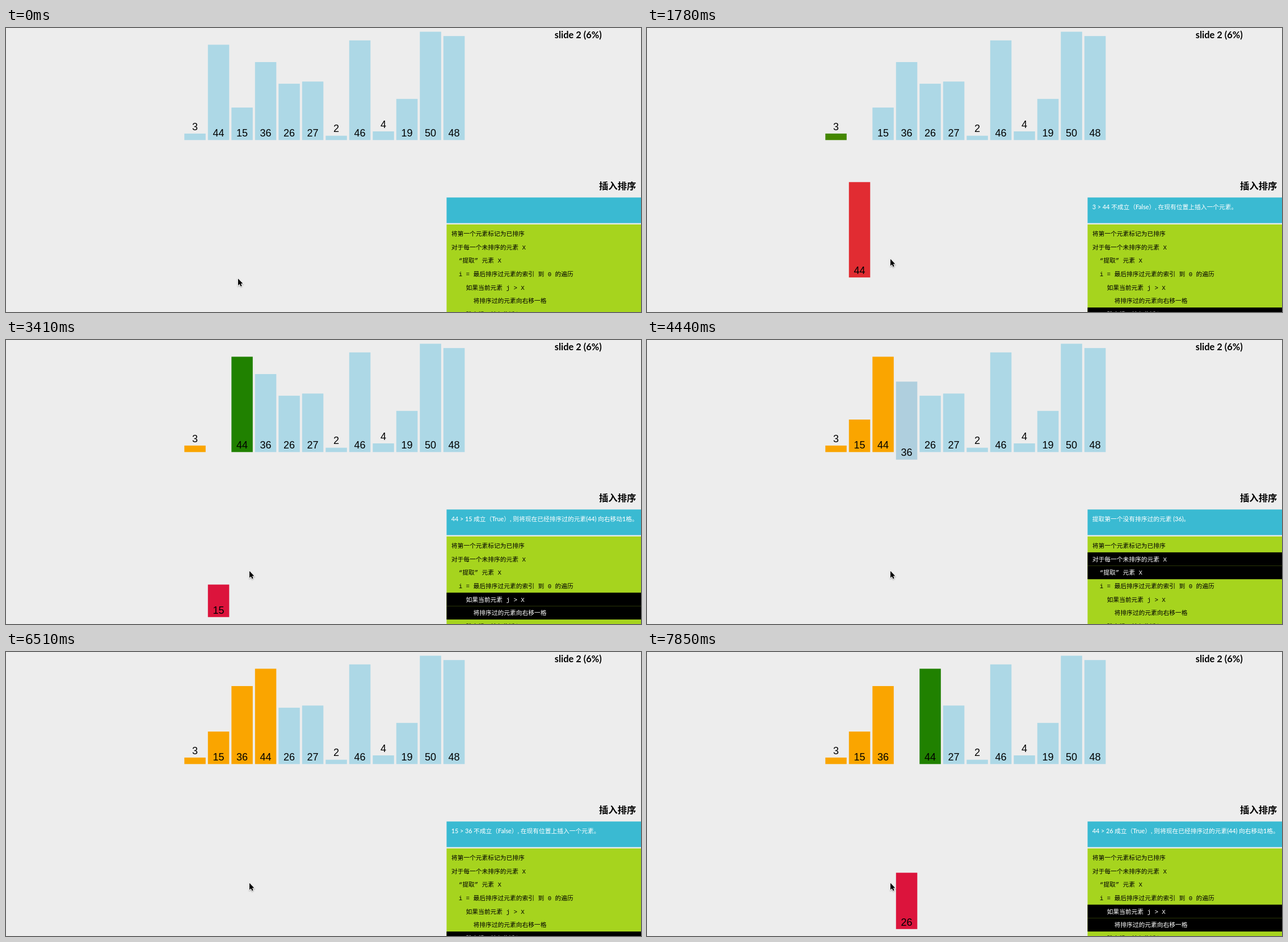
Write an HTML page with a canvas that moves like this. It is 1119x500 px and loops after 7.99 s.

```html
<!DOCTYPE html>
<html lang="zh">
<head>
<meta charset="utf-8">
<title>插入排序</title>
<style>
html, body { margin: 0; width: 1119px; height: 500px; overflow: hidden; background: #ededed; }
canvas { display: block; }
</style>
</head>
<body>
<canvas id="stage" width="1119" height="500"></canvas>
<script>
const ctx = document.getElementById('stage').getContext('2d');

const LOOP = 7990, FIRST_STEP = 348, STEP_GAP = 448.4, EASE_TIME = 250;
const BLUE = [173, 216, 230], ORANGE = [250, 165, 0], GREEN = [32, 129, 0], RED = [220, 20, 60];
const BAR_X = 314.3, PITCH = 41.5, BAR_W = 37.5, BASE = 197.3, UNIT = 3.815, DROP = 290.5;
const PANEL_X = 776.4, LINE_H = 23.65;
const CODE = [
  '将第一个元素标记为已排序',
  '对于每一个未排序的元素 X',
  '  “提取” 元素 X',
  '  i = 最后排序过元素的索引 到 0 的遍历',
  '    如果当前元素 j > X',
  '      将排序过的元素向右移一格',
  '    跳出循环并在此插入'
];
const CJK = '"Noto Sans CJK SC", "Noto Sans CJK", sans-serif';

// The picture is sampled every 150 ms, with a few shorter intervals.
const shortStarts = new Set([300, 740, 2080, 3270, 3560, 3850, 4440, 5330, 6070, 7560, 7850]);
const ticks = [];
for (let t = 0; t < LOOP; t += shortStarts.has(t) ? 140 : 150) ticks.push(t);

const bars = [3, 44, 15, 36, 26, 27, 2, 46, 4, 19, 50, 48].map((value, slot) =>
  ({ value, keys: [{ at: -1e4, slot, drop: 0, color: BLUE }] }));
const steps = [];

const stepTime = k => FIRST_STEP + k * STEP_GAP;

function addStep(message, firstLine, lastLine, changes) {
  const at = stepTime(steps.length);
  steps.push({ at, message, firstLine, lastLine });
  for (const [bar, props] of changes) {
    bar.keys.push({ ...bar.keys[bar.keys.length - 1], ...props, at });
  }
}

function planSort() {
  const row = [...bars];
  addStep(`将第一个元素 (${row[0].value}) 标记为已排序。`, 0, 0, [[row[0], { color: ORANGE }]]);
  for (let i = 1; stepTime(steps.length) < LOOP; i++) {
    const x = row[i];
    addStep(`提取第一个没有排序过的元素 (${x.value})。`, 1, 2, [[x, { drop: DROP, color: RED }]]);
    let shifted = null;
    for (let j = i - 1; j >= 0; j--) {
      const bar = row[j];
      const changes = [[bar, { color: GREEN }]];
      if (shifted) changes.push([shifted, { color: ORANGE }]);
      addStep(`找出插入的位置；与已经排序过的元素 (${bar.value}) 进行比较。`, 3, 3, changes);
      if (bar.value <= x.value) {
        addStep(`${bar.value} > ${x.value} 不成立（False）, 在现有位置上插入一个元素。`, 6, 6,
          [[bar, { color: ORANGE }], [x, { drop: 0, color: ORANGE }]]);
        break;
      }
      addStep(`${bar.value} > ${x.value} 成立（True）, 则将现在已经排序过的元素(${bar.value}) 向右移动1格。`, 4, 5,
        [[bar, { slot: j + 1 }], [x, { slot: j }]]);
      row[j + 1] = bar;
      row[j] = x;
      shifted = bar;
    }
  }
}

const mix = (a, b, p) => a + (b - a) * p;
const cubicInOut = p => p < 0.5 ? 4 * p ** 3 : 1 - 4 * (1 - p) ** 3;

function poseAt(bar, t) {
  const n = bar.keys.findLastIndex(key => key.at <= t);
  const to = bar.keys[n], from = bar.keys[Math.max(0, n - 1)];
  const p = cubicInOut(Math.min(1, (t - to.at) / EASE_TIME));
  return {
    x: BAR_X + mix(from.slot, to.slot, p) * PITCH,
    bottom: BASE + mix(from.drop, to.drop, p),
    color: `rgb(${to.color.map((c, i) => Math.round(mix(from.color[i], c, p)))})`
  };
}

function box(color, x, y, w, h) {
  ctx.fillStyle = color;
  ctx.fillRect(x, y, w, h);
}

function write(text, x, y, font, color = '#000', align = 'left') {
  ctx.font = font;
  ctx.fillStyle = color;
  ctx.textAlign = align;
  ctx.fillText(text, x, y);
}

function drawBar(bar, t) {
  const { x, bottom, color } = poseAt(bar, t);
  const height = bar.value * UNIT;
  box(color, x, bottom - height, BAR_W, height);
  const labelBase = height < 20 ? bottom - height : bottom;
  write(bar.value, x + BAR_W / 2, labelBase - 6.2, '18px "Liberation Sans", Arial, sans-serif', '#000', 'center');
}

function drawPanel(step) {
  box('#3abad2', PANEL_X, 298.4, 343, 45.1);
  box('#a6d41e', PANEL_X, 345.8, 343, 155);
  if (step) write(step.message, 784.8, 318.6, `500 10.75px Lato, ${CJK}`, '#fff');
  CODE.forEach((line, i) => {
    const active = step && i >= step.firstLine && i <= step.lastLine;
    const top = i ? 350.2 + i * LINE_H : 345.8;
    if (active) box('#000', PANEL_X, top, 343, 350.2 + (i + 1) * LINE_H - top);
    write(line, 784.8, 366 + i * LINE_H, `500 10.75px "Liberation Mono", ${CJK}`, active ? '#fff' : '#000');
  });
}

function drawCursor(x, y) {
  const arrow = new Path2D('M0 0V12L2.7 9.5L4.7 13.6L6.6 12.8L4.8 8.8H8.4Z');
  ctx.save();
  ctx.translate(x, y);
  ctx.shadowColor = 'rgba(0,0,0,.35)';
  ctx.shadowBlur = 2;
  ctx.shadowOffsetY = 1;
  ctx.strokeStyle = '#fff';
  ctx.lineWidth = 1.6;
  ctx.stroke(arrow);
  ctx.shadowColor = 'transparent';
  ctx.fillStyle = '#000';
  ctx.fill(arrow);
  ctx.restore();
}

function draw(now) {
  const time = now % LOOP;
  const t = ticks.findLast(tick => tick <= time);
  box('#ededed', 0, 0, 1119, 500);
  write('slide 2 (6%)', 966.8, 18.3, 'bold 16.4px Lato, sans-serif');
  bars.forEach(bar => drawBar(bar, t));
  write('插入排序', 1110.5, 284, `bold 16.4px ${CJK}`, '#000', 'right');
  drawPanel(steps.findLast(step => step.at <= t));
  if (t < 150) drawCursor(409, 441.3);
  else drawCursor(429, 406.8);
  requestAnimationFrame(draw);
}

planSort();
requestAnimationFrame(draw);
</script>
</body>
</html>
```
